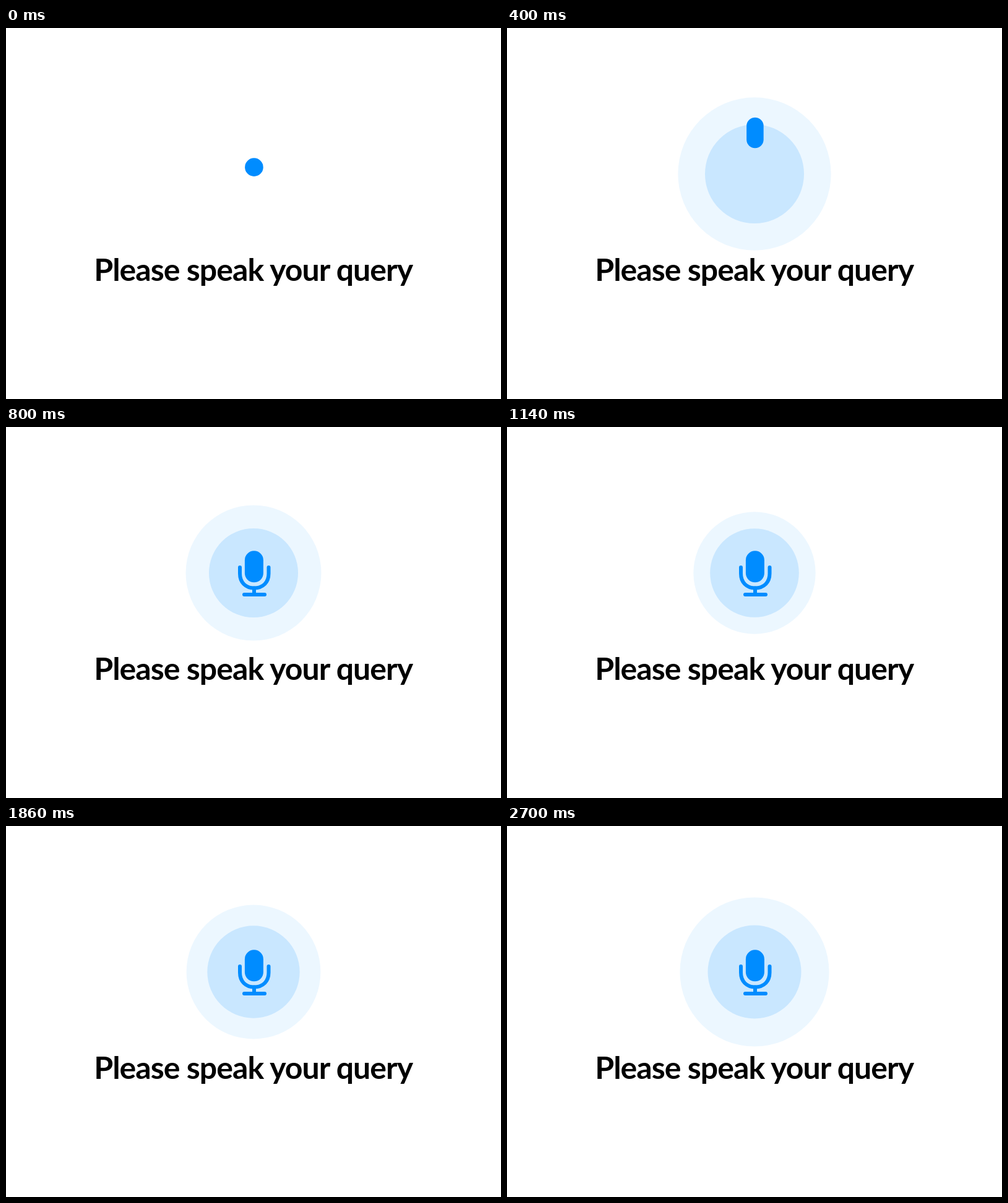
An HTML page that plays this animation: 800x600 px, repeating every 2720 ms.

```html
<!DOCTYPE html>
<html lang="en">
<head>
<meta charset="utf-8">
<title>Voice query</title>
<style>
  html, body { margin: 0; width: 100%; height: 100%; overflow: hidden; background: #fff; }
  svg { display: block; width: 100vw; height: 100vh; }
  text { font: 700 50px Lato, sans-serif; letter-spacing: -0.95px; text-anchor: middle; }
  .line { fill: none; stroke: #008cff; stroke-width: 6; stroke-linecap: round; }
</style>
</head>
<body>
<svg viewBox="0 0 800 600">
  <circle id="outer" cx="400" cy="236" fill="#ecf7ff"/>
  <circle id="inner" cx="400" cy="236" fill="#c9e7ff"/>
  <path id="cupLeft" class="line" pathLength="1" d="M401 260.5C387 260.5 378 251 378 237V227"/>
  <path id="cupRight" class="line" pathLength="1" d="M401 260.5C415.5 260.5 424.5 251 424.5 237V227"/>
  <path id="stem" class="line" style="stroke-linecap:butt"/>
  <path id="base" class="line"/>
  <rect id="pill" fill="#008cff"/>
  <text x="399.7" y="409">Please speak your query</text>
</svg>
<script>
const LOOP = 2720, PERIOD = 1070;
const el = id => document.getElementById(id);
const set = (id, attrs) => {
  for (const k in attrs) el(id).setAttribute(k, attrs[k]);
};
const span = (t, a, b) => Math.min(1, Math.max(0, (t - a) / (b - a)));
const cubicOut = u => 1 - (1 - u) ** 3;
const cosine = u => (1 - Math.cos(Math.PI * u)) / 2;
const mix = (a, b, u) => a + (b - a) * u;
const wave = (t, peak) => Math.cos((t - peak) / PERIOD * 2 * Math.PI);

// Smoothly follows [time, value] keys.
function follow(t, keys) {
  let v = keys[0][1];
  for (let i = 1; i < keys.length; i++) {
    const [a, from] = keys[i - 1], [b, to] = keys[i];
    if (t >= a) v = mix(from, to, cosine(span(t, a, b)));
  }
  return v;
}

function outerRadius(t) {
  if (t < 515) return 125 * cubicOut(t / 515);
  if (t < 1050) return mix(125, 97, cosine(span(t, 515, 1050)));
  return 109 + 12 * wave(t, 1585);
}

function innerRadius(t) {
  if (t < 470) return 80.5 * cubicOut(span(t, 95, 468));
  if (t < 1150) return mix(80.5, 71.8, cubicOut(span(t, 470, 950)));
  return 73.7 + 1.9 * wave(t, 1685);
}

function drawPill(t) {
  const u = span(t, 0, 508);
  const cy = 225.8 - 84.6 * 4 * u * (1 - u);
  const w = follow(t, [[0, 29.6], [160, 24.5], [254, 24], [400, 27.5], [508, 30]]);
  const h = follow(t, [[0, 29.6], [160, 52.6], [254, 52], [400, 49.5], [508, 51]]);
  set("pill", { x: 400.9 - w / 2, y: cy - h / 2, width: w, height: h, rx: w / 2 });
}

function drawStand(t) {
  const cup = cubicOut(span(t, 480, 700));
  for (const id of ["cupLeft", "cupRight"]) {
    set(id, { "stroke-dasharray": cup + " 2", visibility: cup ? "visible" : "hidden" });
  }
  const stem = cubicOut(span(t, 540, 660));
  set("stem", { d: `M401 261V${261 + 9 * stem}` });
  const half = 16.5 * cubicOut(span(t, 580, 760));
  set("base", {
    d: `M${401.5 - half} 271H${401.5 + half}`,
    visibility: half ? "visible" : "hidden"
  });
}

function draw(t) {
  set("outer", { r: outerRadius(t) });
  set("inner", { r: innerRadius(t) });
  drawStand(t);
  drawPill(t);
}

const start = performance.now();
function tick(now) {
  draw(Math.max(0, now - start) % LOOP);
  requestAnimationFrame(tick);
}
draw(0);
requestAnimationFrame(tick);
</script>
</body>
</html>
```
